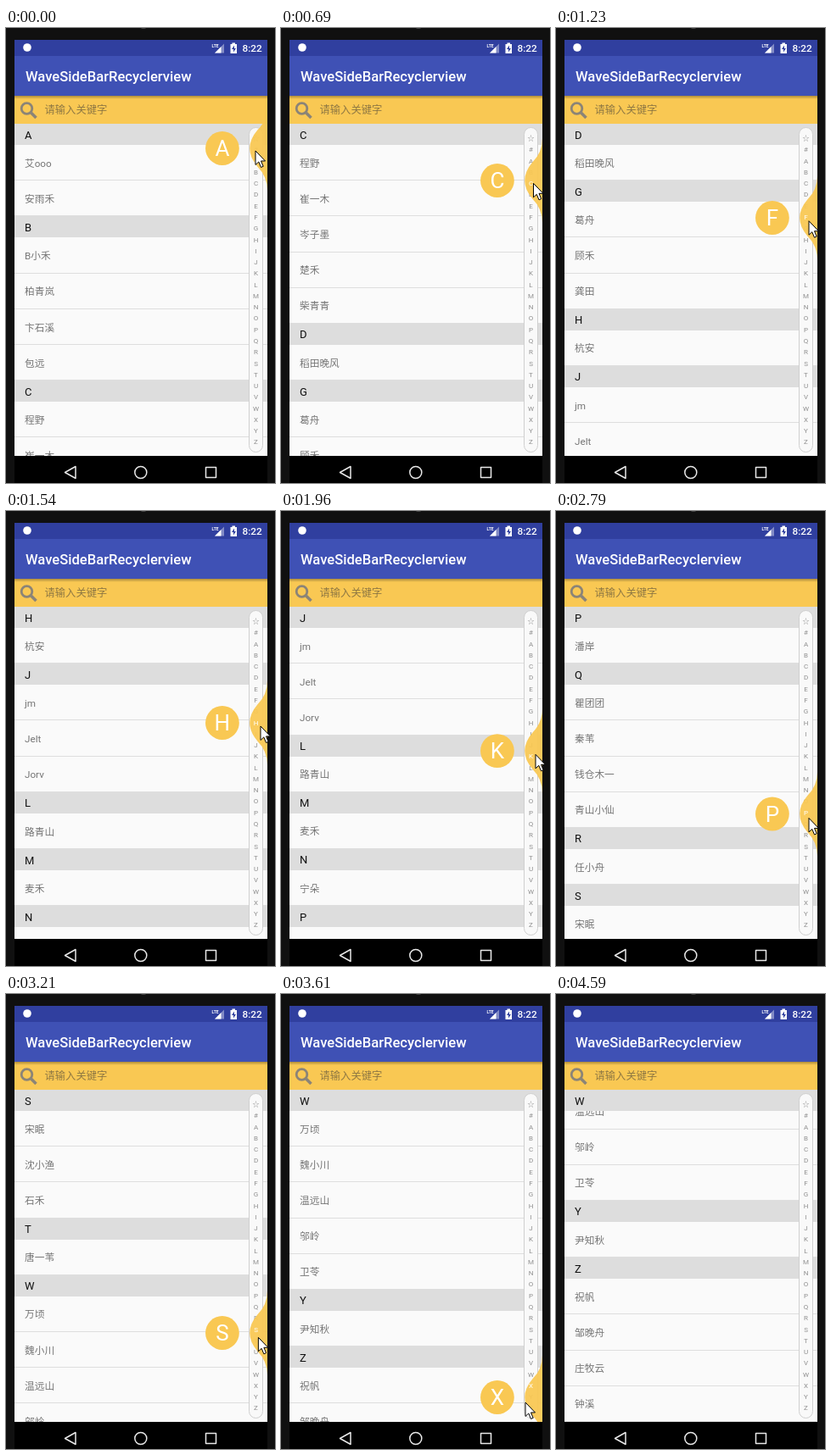
Recreate the animation shown at these times as an HTML page. Size 317 px wide and 537 px high, loop 6.87 s.

```html
<!DOCTYPE html>
<html lang="zh">
<head>
<meta charset="utf-8">
<title>Wave side bar</title>
<style>
  html, body { margin: 0; width: 100%; height: 100%; overflow: hidden; background: #101010; }
  svg { display: block; width: 317px; height: 537px; }
  text { font-family: Roboto, "Noto Sans CJK SC", "Noto Sans CJK", sans-serif; }
  .head { font-size: 13px; fill: #111; }
  .row { font-size: 11.7px; fill: #757575; }
  .index { font-size: 8px; fill: #8e8e8e; text-anchor: middle; }
  .index .on { fill: #fff; }
  .crisp { shape-rendering: crispEdges; }
</style>
</head>
<body>
<svg viewBox="0 0 317 537">
  <defs>
    <clipPath id="listClip"><rect x="10" y="113" width="298" height="392"/></clipPath>
    <linearGradient id="shade" x1="0" y1="0" x2="0" y2="1">
      <stop offset="0" stop-color="#000" stop-opacity=".3"/>
      <stop offset="1" stop-color="#000" stop-opacity="0"/>
    </linearGradient>
  </defs>

  <rect width="317" height="537" fill="#101010"/>
  <ellipse cx="162" cy="0" rx="3" ry="1" fill="#444"/>
  <rect x="10" y="14" width="298" height="20" fill="#303f9f"/>
  <rect x="10" y="33" width="298" height="47" fill="#3f51b5"/>
  <rect x="10" y="80" width="298" height="33" fill="#f9c853"/>
  <rect x="10" y="80" width="298" height="4" fill="url(#shade)"/>

  <!-- status bar -->
  <g fill="#fff">
    <circle cx="25" cy="23" r="4.8"/>
    <text x="242.5" y="22.5" font-size="5" font-weight="700">LTE</text>
    <path d="M246 29.5L257 18.500V29.500Z" opacity=".4"/>
    <path d="M246 29.500L253.500 22V29.500Z"/>
    <path d="M264.500 19H266.500V17.500H270V19H272V30H264.500Z"/>
    <path d="M269 20.500L266 25H268V28.500L271 24H269Z" fill="#303f9f"/>
    <text x="278.500" y="28" font-size="11.8" font-weight="500">8:22</text>
    <text x="23" y="63" font-size="16.6" font-weight="500">WaveSideBarRecyclerview</text>
  </g>

  <!-- search field -->
  <g fill="none" stroke="#8b8477">
    <circle cx="24.500" cy="95" r="6.300" stroke-width="2.800"/>
    <path d="M29.500 100L35.500 106" stroke-width="3.600"/>
  </g>
  <text x="45.500" y="101.300" font-size="12.300" fill="#8f7843">请输入关键字</text>

  <g clip-path="url(#listClip)">
    <rect x="10" y="113" width="298" height="392" fill="#fafafa"/>
    <g id="list"></g>
    <g id="sticky"></g>
    <rect x="286.500" y="117.500" width="16" height="383" rx="8" fill="#f9f9f9" stroke="#cfcfcf"/>
    <g id="index" class="index"></g>
    <g id="bubble">
      <path id="wave" fill="#f9c853" fill-opacity=".94"/>
      <circle id="ball" r="19.900" fill="#f9c853"/>
      <text id="big" font-size="26" fill="#fff" text-anchor="middle"></text>
    </g>
    <g class="index"><text id="chosen" class="on" x="294.500"></text></g>
  </g>

  <!-- navigation bar -->
  <rect x="10" y="505" width="298" height="32" fill="#000"/>
  <g fill="none" stroke="#e8e8e8" stroke-width="1.500" stroke-linejoin="round">
    <path d="M69.500 524.500L82 517.500V531.500Z"/>
    <circle cx="158.800" cy="524.500" r="7"/>
    <rect x="235.500" y="518.500" width="12" height="12"/>
  </g>
  <path id="cursor" d="M0 0V16.500L3.800 13L6.500 19.500L9.200 18.300L6.500 12H11.500Z"
    fill="#fff" stroke="#000" stroke-linejoin="round"/>
</svg>
<script>
const LOOP = 6870, TOP = 113, VIEW = 392, RIGHT = 308;
const HEAD = 25, ROW = 42.2;
const WAVE_R = 16.6, BALL_R = 19.9;
const RELEASE = 4030, SETTLED = 4590;

const LETTERS = '☆#ABCDEFGHIJKLMNOPQRSTUVWXYZ';
const CONTACTS = {
  A: '艾ooo 安雨禾',
  B: 'B小禾 柏青岚 卞石溪 包远',
  C: '程野 崔一木 岑子墨 楚禾 柴青青',
  D: '稻田晚风',
  G: '葛舟 顾禾 龚田',
  H: '杭安',
  J: 'jm Jelt Jorv',
  L: '路青山',
  M: '麦禾',
  N: '宁朵',
  P: '潘岸',
  Q: '瞿团团 秦苇 钱仓木一 青山小仙',
  R: '任小舟',
  S: '宋眠 沈小渔 石禾',
  T: '唐一苇',
  W: '万顷 魏小川 温远山 邬岭 卫苓',
  Y: '尹知秋',
  Z: '祝帆 邹晚舟 庄牧云 钟溪'
};

// The screen refreshes only at these moments.
const TICKS = [0, 150, 270, 390, 540, 690, 840, 970, 1110, 1230, 1390, 1540, 1690, 1810,
  1960, 2080, 2200, 2360, 2510, 2660, 2790, 2930, 3060, 3210, 3330, 3460, 3610, 3730,
  3880, RELEASE, SETTLED];
const TOUCH_Y = [[0, 142], [390, 167], [540, 174], [690, 180], [840, 190], [970, 199],
  [1230, 224], [1540, 250], [2200, 302], [2790, 357.5], [3060, 385], [3210, 400],
  [3460, 455], [3610, 476], [3730, 488], [3880, 511]];
const TIP_X = [[0, 294], [690, 297.5], [1230, 298], [1390, 300], [2360, 300], [2790, 298],
  [3460, 297], [3610, 288], [3880, 290]];

const $ = id => document.getElementById(id);
const letterY = i => 130.2 + 13.27 * i;

function along(keys, t) {
  const n = keys.findIndex(k => k[0] > t);
  if (n < 0) return keys[keys.length - 1][1];
  const [t0, a] = keys[n - 1], [t1, b] = keys[n];
  return a + (b - a) * (t - t0) / (t1 - t0);
}

function header(letter, y) {
  return `<rect class="crisp" x="10" y="${y}" width="298" height="${HEAD}" fill="#ddd"/>
    <text class="head" x="22" y="${y + 17.500}">${letter}</text>`;
}

function row(name, y) {
  return `<text class="row" x="22" y="${y + 25.700}">${name}</text>
    <rect class="crisp" x="10" y="${y + ROW - 1}" width="298" height="1" fill="#dedede"/>`;
}

const sections = [];
let total = 0, listMarkup = '';
for (const [letter, names] of Object.entries(CONTACTS)) {
  sections.push({ letter, top: total });
  listMarkup += header(letter, total);
  total += HEAD;
  for (const name of names.split(' ')) {
    listMarkup += row(name, total);
    total += ROW;
  }
}
$('list').innerHTML = listMarkup;
$('index').innerHTML = [...LETTERS].map((c, i) =>
  `<text x="294.500" y="${letterY(i) + 2.900}">${c}</text>`).join('');

const lastWhere = test => sections.filter(test).pop() || sections[0];

function scrollTo(letter) {
  const y = Math.min(lastWhere(s => s.letter <= letter).top, total - VIEW);
  $('list').setAttribute('transform', `translate(0 ${TOP - y})`);
  $('sticky').innerHTML = header(lastWhere(s => s.top <= y + .01).letter, TOP);
}

function wavePath(y, ratio) {
  const r = WAVE_R, d = r * Math.SQRT1_2;
  const x = RIGHT - d * ratio;
  return `M${RIGHT} ${y - 3 * r}Q${RIGHT} ${y - 2 * r} ${x} ${y - 2 * r + d}
    Q${RIGHT - 1.8 * r * ratio} ${y} ${x} ${y + 2 * r - d}
    Q${RIGHT} ${y + 2 * r} ${RIGHT} ${y + 3 * r}Z`;
}

function show(el, on) {
  el.setAttribute('visibility', on ? 'visible' : 'hidden');
}

function draw(t) {
  const y = along(TOUCH_Y, t);
  const pick = Math.min(LETTERS.length - 1, Math.floor((y - TOP) / 14));
  const letter = LETTERS[pick];
  const held = t < RELEASE, active = t < SETTLED;
  const ratio = held ? 1 : .22;
  const ballX = RIGHT + BALL_R - 2 * (WAVE_R + BALL_R) * ratio;

  scrollTo(letter);
  $('wave').setAttribute('d', wavePath(y, ratio));
  $('ball').setAttribute('cx', ballX);
  $('ball').setAttribute('cy', y);
  $('big').setAttribute('x', ballX);
  $('big').setAttribute('y', y + 9.400);
  $('big').textContent = held ? letter : '';
  $('chosen').setAttribute('y', letterY(pick) + 2.900);
  $('chosen').textContent = letter;
  [...$('index').children].forEach((el, i) => show(el, !(active && i === pick)));
  show($('bubble'), active);
  show($('chosen'), active);
  show($('cursor'), held);
  $('cursor').setAttribute('transform', `translate(${along(TIP_X, t)} ${y * 1.009 + 1.7})`);
}

const start = performance.now();
let shown = -1;
function tick() {
  const t = (performance.now() - start) % LOOP;
  const step = TICKS.filter(k => k <= t).pop();
  if (step !== shown) draw(shown = step);
  requestAnimationFrame(tick);
}
tick();
</script>
</body>
</html>
```
